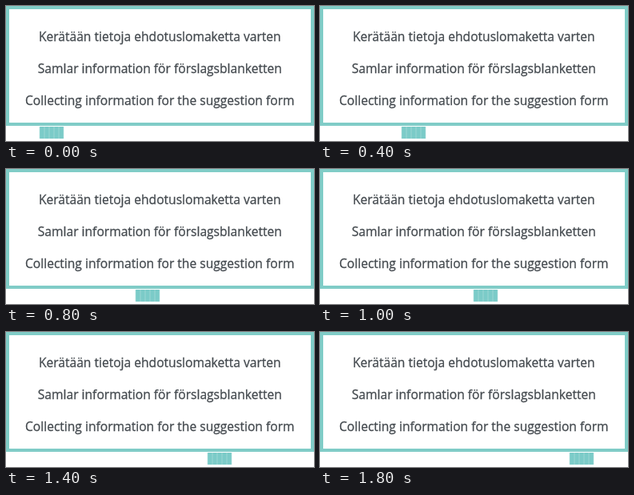
These frames come from a looping animation (385 px wide and 169 px high, 2000 ms). An HTML page:

```html
<!DOCTYPE html>
<html lang="en">
<head>
<meta charset="utf-8">
<style>
  html, body { margin: 0; width: 100%; height: 100%; overflow: hidden; background: #fff; }
  svg { display: block; width: 385px; height: 169px; }
  text {
    font: 15.6px "Open Sans", "Noto Sans", sans-serif;
    fill: #444a4f; stroke: #444a4f; stroke-width: .3px; text-anchor: middle;
  }
</style>
</head>
<body>
<svg viewBox="0 0 385 169">
  <defs>
    <pattern id="stripes" width="6" height="15" patternUnits="userSpaceOnUse">
      <rect width="6" height="15" fill="#8bd1ce"/>
      <rect x="1" width="4" height="15" fill="#7bcbc8"/>
    </pattern>
  </defs>
  <rect x="2" y="2" width="381" height="146" fill="#fff" stroke="#80ccc7" stroke-width="4"/>
  <text x="192.3" y="44">Kerätään tietoja ehdotuslomaketta varten</text>
  <text x="192.3" y="84">Samlar information för förslagsblanketten</text>
  <text x="192.3" y="124">Collecting information for the suggestion form</text>
  <rect id="block" y="151" width="30.4" height="15" fill="url(#stripes)"/>
</svg>
<script>
  const LOOP = 2000, STEP = 200, STRIDE = 30, LEFT = 41.8;
  const block = document.getElementById("block");
  const start = performance.now();

  function draw(now) {
    const time = Math.max(0, now - start) % LOOP;
    block.setAttribute("x", LEFT + STRIDE * Math.floor(time / STEP));
    requestAnimationFrame(draw);
  }
  draw(start);
</script>
</body>
</html>
```
